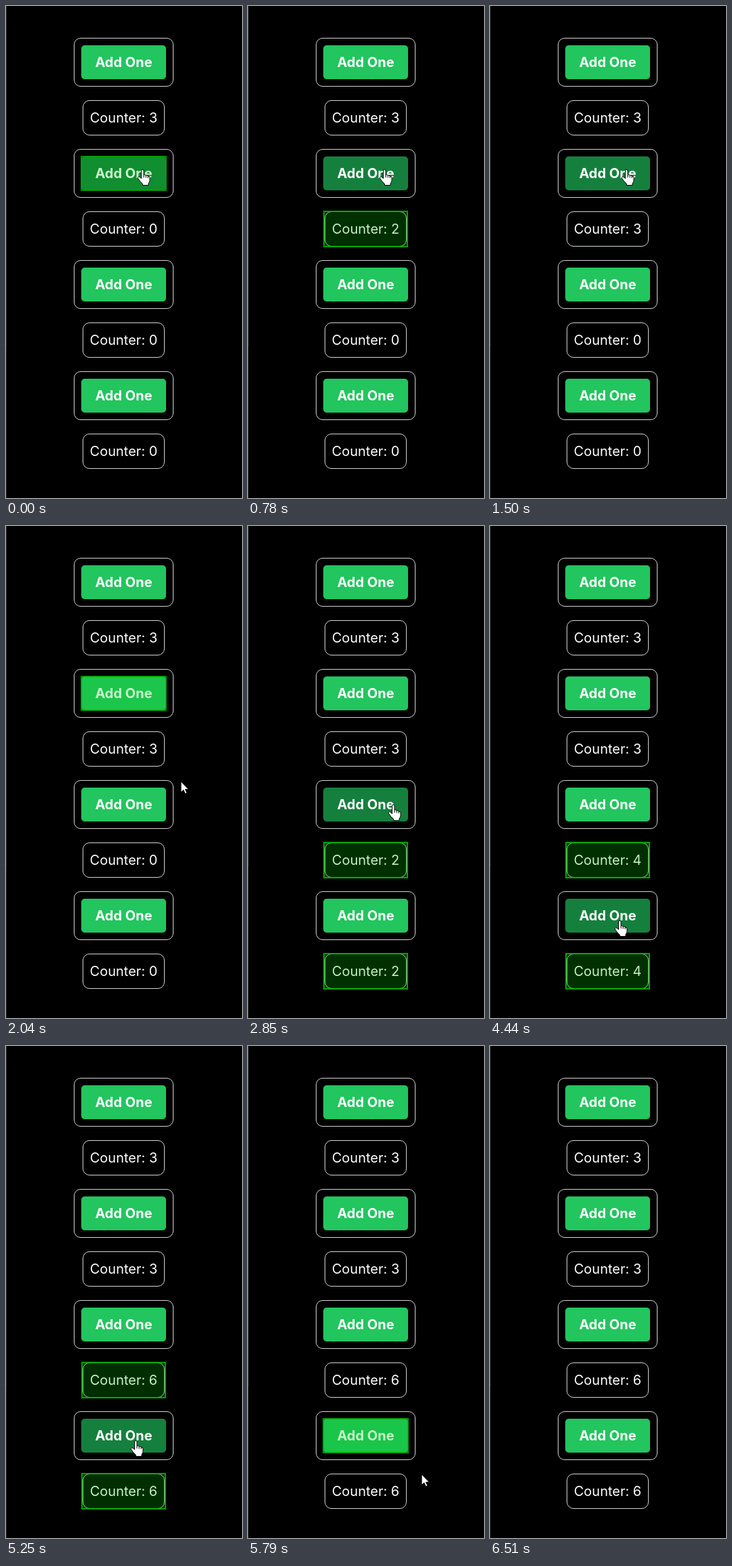
Recreate the animation shown at these times as an HTML page. Size 348 by 726 pixels, loop 6.53 s.

```html
<!DOCTYPE html>
<html lang="en">
<head>
<meta charset="utf-8">
<title>Counters</title>
<style>
  html, body { margin: 0; width: 100%; height: 100%; overflow: hidden; background: #000; }
  svg { display: block; width: 348px; height: 726px; }
  text { font: 20px Inter, sans-serif; fill: #fff; text-anchor: middle; }
  .label { font-weight: 700; }
  .frame { fill: none; stroke: #d4d4d4; }
  .flash { fill: #00c800; fill-opacity: .24; stroke: #00b400; stroke-width: 2; stroke-opacity: .9; }
  .pointer { fill: #fff; stroke: #000; stroke-linejoin: round; }
</style>
</head>
<body>
<svg viewBox="0 0 348 726">
  <path d="M.5 0V500" stroke="#383838"/>
  <path d="M.5 500V726" stroke="#555" stroke-dasharray="1 1"/>
  <g id="rows"></g>
  <g id="cursor" class="pointer">
    <path id="arrow" d="M0 0V16L3.7 12.6 6.2 18 8.8 16.9 6.4 11.7H11.3Z"/>
    <g id="hand">
      <path d="M-.5 12V2Q-.5 .3 1.3 .3T3.1 2V8Q5.8 7.2 6.2 9 8.8 8.3 9.2 10.2 12 9.8 12 12.4V16.5Q11.8 18.6 10 21V23.6H1.5V21.4Q-2.2 18.5-5.3 13.6-6.3 11.5-4.5 10.8-2.8 10.4-.5 13.6Z"/>
      <path d="M3.1 8V12M6.2 9V12.5M9.2 10.2V13" fill="none"/>
    </g>
  </g>
</svg>
<script>
const LOOP = 6530, STEP = 135, PITCH = 164;
const FADE = 350, CLICK_GAP = 380, GLIDE = 240;
const $ = id => document.getElementById(id);

// Each stop: pointer position, first of three clicks, departure, bend of the way out
const stops = [
  { x: 200, y: 241, click: 380, go: 1865, bend: { x: 318, y: 376 } },
  { x: 213, y: 411, click: 2440, go: 3485, bend: { x: 310, y: 568 } },
  { x: 190, y: 582, click: 4450, go: 5670, bend: { x: 250, y: 610 } }
];
const exit = { x: 305, y: 697 };

// The pointer crosses a button's edge shortly after leaving and before arriving
stops.forEach((stop, i) => {
  stop.clicks = [0, 1, 2].map(n => stop.click + n * CLICK_GAP);
  stop.hover = [i ? stops[i - 1].go + GLIDE * .87 : -140, stop.go + GLIDE * .13];
});

// The last two counters share one value
const [second, third, fourth] = stops;
const shared = [...third.clicks, ...fourth.clicks];
const rows = [
  { start: 3, clicks: [], hover: [] },
  { start: 0, clicks: second.clicks, hover: second.hover },
  { start: 0, clicks: shared, hover: third.hover },
  { start: 0, clicks: shared, hover: fourth.hover }
];

$('rows').innerHTML = rows.map((_, i) => `
  <g transform="translate(0 ${i * PITCH})">
    <rect class="frame" x="100.5" y="47.5" width="146" height="71" rx="9.5"/>
    <rect class="button" x="111" y="58" width="125" height="50" rx="5"/>
    <text class="label" x="173.5" y="90">Add One</text>
    <rect class="flash" x="111" y="58" width="125" height="50"/>
    <rect class="frame" x="113.5" y="139.5" width="120" height="51" rx="9.5"/>
    <text class="count" x="173.5" y="172"></text>
    <rect class="flash" x="112" y="139" width="123" height="52"/>
  </g>`).join('');
rows.forEach((row, i) => {
  const g = $('rows').children[i];
  row.button = g.querySelector('.button');
  row.count = g.querySelector('.count');
  row.flashes = g.querySelectorAll('.flash');
});

function glow(t, events) {
  const age = t - Math.max(...events.filter(e => e <= t));
  return Math.max(0, 1 - (age / FADE) ** 2);
}

function pointerAt(t) {
  const i = Math.max(0, stops.findLastIndex(s => s.go <= t));
  const from = stops[i], to = stops[i + 1] || exit;
  const u = Math.min(1, Math.max(0, (t - from.go) / GLIDE));
  const curve = k => (1 - u) ** 2 * from[k] + 2 * u * (1 - u) * from.bend[k] + u * u * to[k];
  return { x: Math.round(curve('x')), y: Math.round(curve('y')) };
}

function draw(t) {
  let hovering = false;
  for (const { start, clicks, hover, button, count, flashes } of rows) {
    const over = t >= hover[0] && t < hover[1];
    hovering ||= over;
    button.setAttribute('fill', over ? '#15803d' : '#22c55e');
    count.textContent = 'Counter: ' + (start + clicks.filter(c => c <= t).length);
    flashes[0].setAttribute('opacity', glow(t, hover));
    flashes[1].setAttribute('opacity', glow(t, clicks));
  }
  const { x, y } = pointerAt(t);
  $('cursor').setAttribute('transform', `translate(${x} ${y})`);
  $('cursor').style.display = t < fourth.go + GLIDE + STEP ? '' : 'none';
  $('hand').style.display = hovering ? '' : 'none';
  $('arrow').style.display = hovering ? 'none' : '';
}

// The screen refreshes in coarse steps
function loop() {
  const t = performance.now() % LOOP;
  draw(Math.floor((t + 40) / STEP) * STEP);
  requestAnimationFrame(loop);
}
loop();
</script>
</body>
</html>
```
